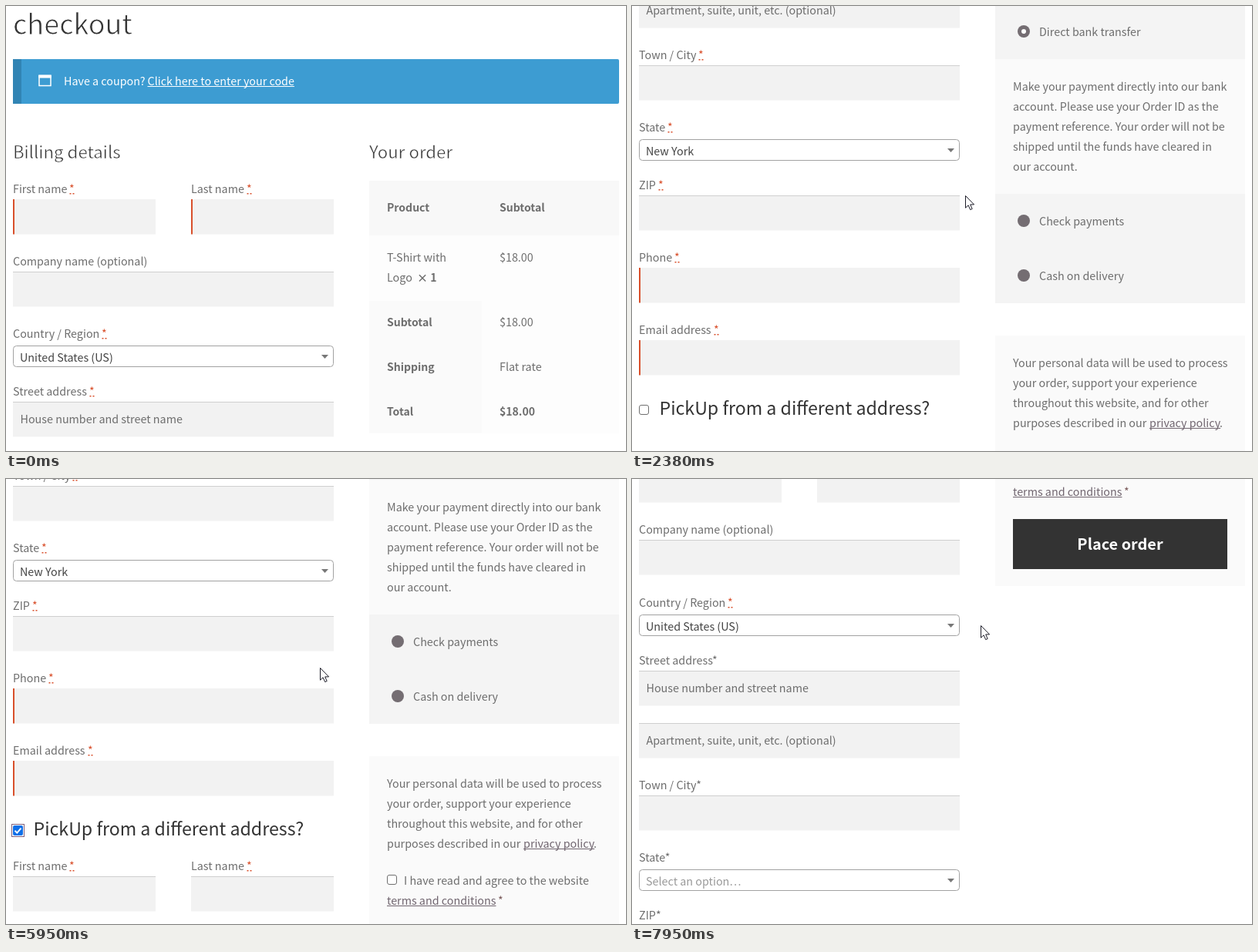
Recreate the animation shown at these times as an HTML page. Size 804 by 578 pixels, loop 8 s.

```html
<!DOCTYPE html>
<html lang="en">
<head>
<meta charset="utf-8">
<title>Checkout</title>
<style>
  html, body { margin: 0; width: 100%; height: 100%; overflow: hidden; background: #fff; }
  svg { display: block; width: 804px; height: 578px; }
  text { font-family: "Noto Sans CJK JP", "Noto Sans CJK SC", "Noto Sans CJK", "Open Sans", sans-serif; }
</style>
</head>
<body>
<svg id="stage" viewBox="0 0 804 578"></svg>
<script>
const LOOP = 8000;
const EM = 14.33; // body text size
const GREY = '#6d6d6d', DARK = '#333', RED = '#d9502c', FIELD = '#f2f2f2';
const stage = document.getElementById('stage');

function add(parent, tag, attrs) {
  const el = document.createElementNS('http://www.w3.org/2000/svg', tag);
  for (const k in attrs) el.setAttribute(k, attrs[k]);
  parent.appendChild(el);
  return el;
}

const page = add(stage, 'g', {});
const closed = add(page, 'g', {}); // shown while the pickup box is unticked
const opened = add(page, 'g', {}); // shown once it is ticked
const fields = [];

function rect(g, x, y, w, h, fill, more) {
  return add(g, 'rect', { x, y, width: w, height: h, fill, ...more });
}

function text(g, s, x, y, o = {}) {
  const el = add(g, 'text', {
    x, y, fill: o.fill || GREY,
    'font-size': EM * (o.size || 1),
    'font-weight': o.weight || 400,
    'text-anchor': o.anchor || 'start'
  });
  el.textContent = s;
  return el;
}

const bold = (g, s, x, y, o) => text(g, s, x, y, { weight: 700, size: 0.98, ...o });

const pen = document.createElement('canvas').getContext('2d');
function widthAt(weight) {
  pen.font = weight + ' 100px "Noto Sans CJK JP", sans-serif';
  return pen.measureText('Billing details').width;
}
const hasLight = widthAt(300) !== widthAt(400);

// Light heading; without a light face the regular one is thinned by a white edge.
function heading(g, s, x, y, size, fill = DARK) {
  const el = text(g, s, x, y, { size: size * (hasLight ? 1 : 0.96), weight: 300, fill });
  if (!hasLight) {
    el.setAttribute('stroke', '#fff');
    el.setAttribute('stroke-width', size * 0.33);
  }
}

function link(g, s, x, y, fill, line) {
  const w = text(g, s, x, y, { fill }).getComputedTextLength();
  rect(g, x, y + 1, w, 1, line || fill);
}

function label(g, s, x, y, star) {
  const w = text(g, s, x, y).getComputedTextLength();
  if (!star) return;
  const sx = Math.round(x + w + 3);
  text(g, '*', sx, y, { fill: RED });
  rect(g, sx + 0.5, y, 2, 1.5, RED);
  rect(g, sx + 4.5, y, 2, 1.5, RED);
}

function input(g, x, y, w, o = {}) {
  rect(g, x, y, w, 45.5, FIELD);
  if (o.invalid) rect(g, x, y, 2, 45.5, RED);
  else rect(g, x, y, w, 1, '#cfcfcf');
  if (o.hint) text(g, o.hint, x + 9.5, y + 28);
  fields.push({ x, y, w, h: 45 });
}

function field(g, s, x, y, w, o = {}) {
  label(g, s, x, y, o.star);
  input(g, x, y + 8, w, o);
}

function select(g, s, y, value, star, fill = '#444') {
  label(g, s, 9, y, star);
  rect(g, 9.5, y + 10.5, 415, 27, '#fff', { rx: 4, stroke: '#a2a2a2' });
  text(g, value, 18, y + 31, { fill });
  add(g, 'path', { d: `M409 ${y + 22}h9l-4.5 5z`, fill: '#777' });
}

const box = (g, x, y) =>
  rect(g, x + 0.5, y + 0.5, 12, 12, '#fff', { rx: 2.5, stroke: '#6f6f6f' });

function address(g, y, star, streetStar, invalid) {
  field(g, 'First name', 9, y, 185, { star: true, invalid });
  field(g, 'Last name', 240, y, 185, { star: true, invalid });
  field(g, 'Company name (optional)', 9, y + 94, 416, {});
  const k = streetStar ? 0 : 1;
  const mark = streetStar ? '' : '*';
  select(g, 'Country / Region', y + 188 + k, 'United States (US)', true);
  field(g, 'Street address' + mark, 9, y + 263 + k, 416,
    { star: streetStar, hint: 'House number and street name' });
  input(g, 9, y + 339 + k, 416, { hint: 'Apartment, suite, unit, etc. (optional)' });
  field(g, 'Town / City' + mark, 9, y + 425 + k, 416, { star: streetStar });
  select(g, 'State' + mark, y + 519 + k, streetStar ? 'New York' : 'Select an option…',
    streetStar, streetStar ? '#444' : '#999');
  field(g, 'ZIP' + mark, 9, y + 594 + k, 416, { star: streetStar });
}

function leftColumn() {
  heading(page, 'Billing details', 9, 198, 1.618);
  address(page, 243, true, true, true);
  field(page, 'Phone', 9, 931, 416, { star: true, invalid: true });
  field(page, 'Email address', 9, 1025, 416, { star: true, invalid: true });
  text(page, 'PickUp from a different address?', 35.5, 1130, { size: 1.618, fill: DARK });

  box(closed, 9, 1117);
  heading(closed, 'Ship to a different address?', 9, 1198, 1.618, '#444');
  box(closed, 412, 1184);
  label(closed, 'Order notes (optional)', 9, 1242);

  rect(opened, 7.5, 1115.5, 16, 16, '#fff', { stroke: '#80607c' });
  rect(opened, 9, 1117, 13, 13, '#0f70e8', { rx: 2 });
  add(opened, 'path', {
    d: 'M11.5 1123.8l2.8 2.8 5.2-6', fill: 'none', stroke: '#fff', 'stroke-width': 2
  });
  address(opened, 1175, true, false, false);
}

function rightColumn() {
  const x = 494, px = 640;
  heading(page, 'Your order', 471, 198, 1.618);
  rect(page, 471, 227, 324, 71, '#f8f8f8');
  rect(page, 471, 298, 324, 257, '#fdfdfd');
  rect(page, 471, 383, 146, 172, '#fafafa');
  bold(page, 'Product', x, 267);
  bold(page, 'Subtotal', px, 267);
  text(page, 'T-Shirt with', x, 332);
  text(page, 'Logo', x, 358);
  bold(page, '× 1', 533, 358);
  text(page, '$18.00', px, 332);
  bold(page, 'Subtotal', x, 416);
  text(page, '$18.00', px, 416);
  bold(page, 'Shipping', x, 474);
  text(page, 'Flat rate', px, 474);
  bold(page, 'Total', x, 532);
  bold(page, '$18.00', px, 532);

  rect(page, 471, 597, 324, 388, '#f4f4f4');
  rect(page, 471, 668, 324, 175, '#fafafa');
  ['Direct bank transfer', 'Check payments', 'Cash on delivery'].forEach((s, i) => {
    const y = [632, 878, 949][i];
    add(page, 'circle', { cx: 508, cy: y, r: 8, fill: '#746d72' });
    if (!i) add(page, 'circle', { cx: 508, cy: y, r: 3, fill: '#fff' });
    text(page, s, 528, y + 6);
  });
  ['Make your payment directly into our bank',
   'account. Please use your Order ID as the',
   'payment reference. Your order will not be',
   'shipped until the funds have cleared in',
   'our account.'].forEach((s, i) => text(page, s, x, 709 + i * 26));

  rect(page, 471, 1027, 324, 310, '#fafafa');
  ['Your personal data will be used to process',
   'your order, support your experience',
   'throughout this website, and for other',
   'purposes described in our'].forEach((s, i) => text(page, s, x, 1068 + i * 26));
  link(page, 'privacy policy', 671, 1146, '#70656f');
  text(page, '.', 762, 1146);
  box(page, x, 1181);
  text(page, 'I have read and agree to the website', 516, 1194);
  link(page, 'terms and conditions', x, 1220, '#70656f');
  text(page, '*', 638, 1220, { fill: '#7a5a5a' });
  rect(page, x, 1250, 278, 65, DARK);
  bold(page, 'Place order', 633, 1290, { size: 1.39, fill: '#fff', anchor: 'middle' });
}

function banner() {
  heading(page, 'checkout', 9, 37, 2.618);
  rect(page, 9, 69, 786, 58, '#3d9cd2', { rx: 2 });
  rect(page, 9, 69, 11, 58, '#3184b4');
  rect(page, 43, 90.5, 15, 13, 'none', { stroke: '#fff', 'stroke-width': 1.5 });
  rect(page, 42.3, 89.5, 16.4, 4, '#fff');
  text(page, 'Have a coupon?', 75, 103, { fill: '#fff' });
  link(page, 'Click here to enter your code', 183.5, 103, '#fff');
}

banner();
leftColumn();
rightColumn();

const arrow = add(stage, 'path', {
  d: 'M.5 .5V16.2L4.1 12.8L6.7 18.6L9.2 17.5L6.7 11.9H11.6Z',
  fill: '#fff', stroke: '#1c1c28', 'stroke-width': 1
});
const beam = add(stage, 'path', {
  d: 'M-3.5 -6.5H-1L.5 -5.5L2 -6.5H4.5M.5 -5.5V6.5M-3.5 7.5H-1L.5 6.5L2 7.5H4.5',
  fill: 'none', stroke: '#222', 'stroke-width': 1.2
});

// Each run: start, end, number of steps, then points [progress, values...].
const scrolls = [
  [790, 1380, 10, [0, 0], [0.6, 167], [1, 266]],
  [1780, 2380, 10, [0, 266], [1, 599]],
  [2570, 2770, 4, [0, 599], [1, 667]],
  [6280, 7220, 15, [0, 667], [0.6, 847], [1, 998]],
  [7550, 7950, 7, [0, 998], [1, 1198]]
];
const moves = [
  [70, 590, 9, [0, 560, 0], [1, 432, 246]],
  [3240, 3960, 12, [0, 432, 246], [7 / 12, 66, 408], [1, 14, 456]],
  [5150, 5220, 2, [0, 14, 456], [1, 20, 452]],
  [5420, 6080, 11, [0, 20, 452], [9 / 11, 407, 245], [1, 452, 190]]
];

function along(points, u) {
  let i = 1;
  while (i < points.length - 1 && u > points[i][0]) i++;
  const a = points[i - 1], b = points[i];
  const k = (u - a[0]) / (b[0] - a[0]);
  return a.slice(1).map((v, j) => Math.round(v + (b[j + 1] - v) * k));
}

function at(runs, t) {
  const run = runs.filter(r => r[0] <= t).pop();
  if (!run) return along(runs[0].slice(3), 0);
  const [t0, t1, n, ...points] = run;
  const step = Math.floor((t - t0) / (t1 - t0) * (n - 1) + 0.15) + 1;
  return along(points, Math.min(step, n) / n);
}

function draw(t) {
  const [top] = at(scrolls, t);
  const [x, y] = at(moves, t);
  const ticked = t >= 4290;
  page.setAttribute('transform', `translate(0 ${-top})`);
  closed.style.display = ticked ? 'none' : '';
  opened.style.display = ticked ? '' : 'none';

  const py = y + top;
  const typing = fields.some(f => x >= f.x && x < f.x + f.w && py >= f.y && py < f.y + f.h);
  const seen = t >= 70;
  arrow.style.display = seen && !typing ? '' : 'none';
  beam.style.display = seen && typing ? '' : 'none';
  for (const c of [arrow, beam]) c.setAttribute('transform', `translate(${x} ${y})`);
}

const start = performance.now();
function tick() {
  draw((performance.now() - start) % LOOP);
  requestAnimationFrame(tick);
}
tick();
</script>
</body>
</html>
```
